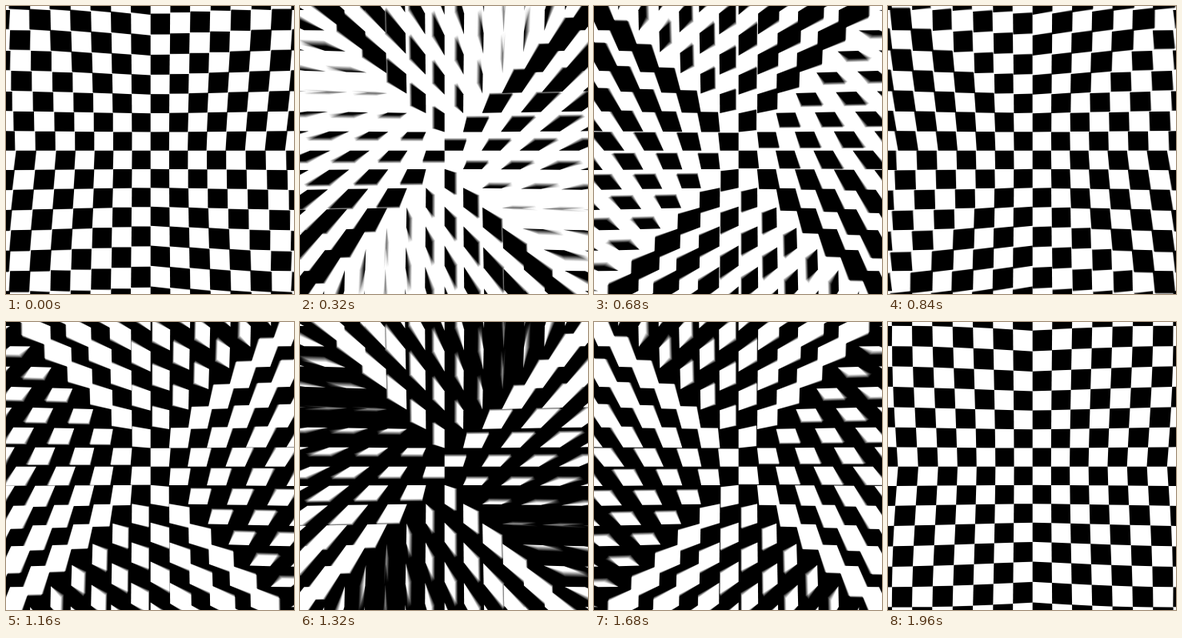
Animation of 360x360 px, one loop 2000 ms. Source, as an HTML page with a canvas:

```html
<!DOCTYPE html>
<html>
<head>
<meta charset="utf-8">
<style>
html, body { margin: 0; width: 100%; height: 100%; overflow: hidden; background: #fff; }
canvas { display: block; }
</style>
</head>
<body>
<canvas id="stage" width="360" height="360"></canvas>
<script>
const SIZE = 360, MID = 180.7, HALF = 1000, STEP = 40, LEAD = 45, SAMPLES = 8;
const CELL = 23.1, DEPTH = 5.3, BOWL = 0.42, REACH = 9;
const stage = document.getElementById('stage').getContext('2d');
const layer = document.createElement('canvas');
layer.width = layer.height = SIZE;
const g = layer.getContext('2d');

// Perspective view of a shallow bowl with diamond-shaped contours.
function project(x, y, z) {
  const d = Math.min(14, 0.97 * Math.abs(x) + 1.13 * Math.abs(y));
  const rise = BOWL * (1 - Math.cos(Math.PI * d / 14)) / 2;
  const scale = CELL / (1 - (z + rise) / DEPTH);
  return [MID + x * scale, MID + y * scale];
}

// A tile turns about one edge and lands on the next cell, clockwise.
function drawTile(i, j, cos, sin) {
  const cx = i + 0.5, cy = j + 0.5;
  const sideways = Math.abs(cx) >= Math.abs(cy);
  const dir = sideways ? Math.sign(cx) : -Math.sign(cy);
  const hinge = (sideways ? j : i) + (dir > 0 ? 1 : 0);
  const far = hinge - dir * cos;
  const a = sideways ? i : j;
  const corner = (u, v, z) => sideways ? project(u, v, z) : project(v, u, z);
  g.beginPath();
  g.lineTo(...corner(a, hinge, 0));
  g.lineTo(...corner(a + 1, hinge, 0));
  g.lineTo(...corner(a + 1, far, sin));
  g.lineTo(...corner(a, far, sin));
  g.fill();
}

function drawMoment(ms) {
  const blackTiles = ms % (2 * HALF) < HALF;
  const p = ms % HALF / HALF;
  const angle = Math.PI * p * p * (3 - 2 * p);
  const cos = Math.cos(angle), sin = Math.sin(angle);
  g.fillStyle = blackTiles ? '#fff' : '#000';
  g.fillRect(0, 0, SIZE, SIZE);
  g.fillStyle = blackTiles ? '#000' : '#fff';
  for (let j = -REACH; j < REACH; j++)
    for (let i = -REACH; i < REACH; i++)
      if ((i + j) & 1) drawTile(i, j, cos, sin);
}

// Motion blur: a running average of moments within one step.
function drawFrame(ms) {
  for (let k = 0; k < SAMPLES; k++) {
    drawMoment(ms + LEAD + STEP * (k + 0.5) / SAMPLES);
    stage.globalAlpha = 1 / (k + 1);
    stage.drawImage(layer, 0, 0);
  }
}

let shown = -1;
function tick() {
  const step = Math.floor((performance.now() + 2) / STEP);
  if (step !== shown) {
    shown = step;
    drawFrame(step * STEP % (2 * HALF));
  }
  requestAnimationFrame(tick);
}
tick();
</script>
</body>
</html>
```
